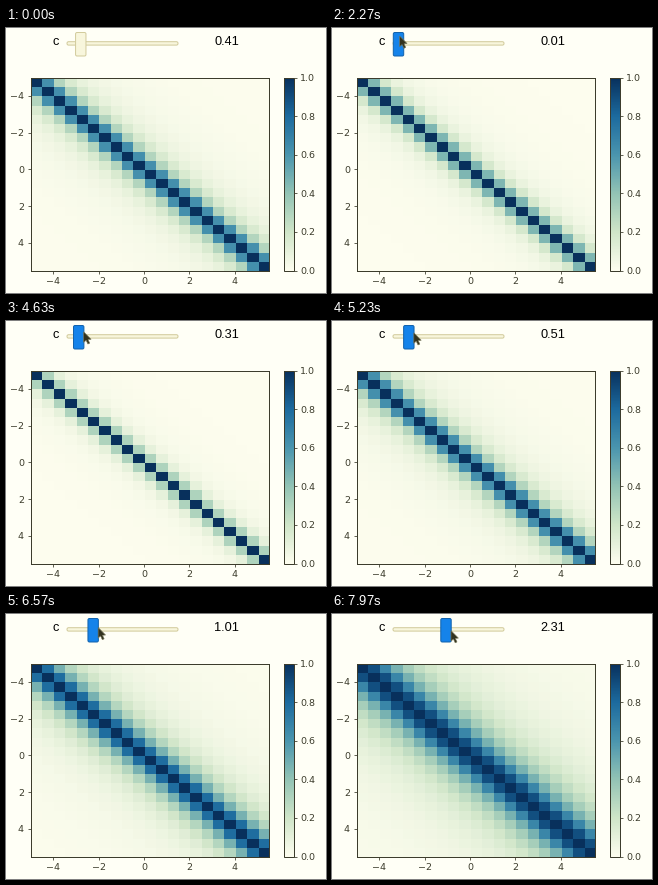
These frames come from a looping animation (320 by 265 pixels, 8000 ms). A matplotlib script:

```python
import numpy as np
import matplotlib.pyplot as plt
from matplotlib.animation import FuncAnimation
from matplotlib.colors import LinearSegmentedColormap
from matplotlib.patches import FancyBboxPatch, Polygon

W, H, DPI = 320, 265, 100
LOOP, FRAMES = 8000, 250
STEP = LOOP // FRAMES
PT = 72 / DPI              # points per pixel
LAG = 300                  # the heat map follows the slider with this delay
HOVER, PRESS = 950, 1600
PAPER, INK = "#fffff6", "#3c3c2c"
IDLE, WARM, ACTIVE = ("#f8f6dc", "#d2cb9c"), ("#eeebca", "#c8c190"), ("#1583ea", "#1263ad")

plt.rcParams.update({"font.family": "DejaVu Sans", "font.size": 9.5 * PT,
                     "axes.linewidth": PT, "axes.edgecolor": INK})


def ramp(t, start, end):
    return min(max((t - start) / (end - start), 0), 1)


def value_at(t):
    steps = (4 - 4 * ramp(t, 1750, 2150) + 8 * ramp(t, 4000, 5770)
             + 2 * ramp(t, 5770, 6570) + 13 * ramp(t, 6570, 7970))
    return 0.01 + 0.1 * round(steps)


def handle_x(v):
    return 66.3 + 20.65 * v


def pointer_at(t):
    v = value_at(t)
    slip = 5 * ramp(t, 0, 4600) ** 2
    drop = 25 * (1 - ramp(t, 700, 1000))
    return np.array([handle_x(v) + slip, 7.5 + 6 * np.sqrt(v) - drop * 1.5])


grid = np.arange(-5, 5.5, 0.5)
dist2 = np.subtract.outer(grid, grid) ** 2


def kernel(c):
    return 1 / (1 + dist2 / c)


def pixel_axes(x0, y0, x1, y1):
    return fig.add_axes([x0 / W, 1 - y1 / H, (x1 - x0) / W, (y1 - y0) / H])


def rounded(x, y, w, h, r, colors):
    fill, edge = colors
    box = FancyBboxPatch((x, y), w, h, fc=fill, ec=edge, lw=PT,
                         boxstyle=f"round,pad=0,rounding_size={r}")
    return panel.add_patch(box)


fig = plt.figure(figsize=(W / DPI, H / DPI), dpi=DPI, facecolor=PAPER)
sea = LinearSegmentedColormap.from_list(
    "sea", ["#fdfdee", "#cfe5c8", "#92c3b4", "#4a95ae", "#1c6a9e", "#08305c"])

heat = pixel_axes(24.5, 49.5, 263, 242.5)
image = heat.imshow(kernel(0.41), cmap=sea, vmin=0, vmax=1, aspect="auto",
                    extent=(-5, 5.5, 5.5, -5), interpolation="nearest")
heat.set_xticks(range(-4, 5, 2))
heat.set_yticks(range(-4, 5, 2))
bar = fig.colorbar(image, cax=pixel_axes(278, 49.5, 287.5, 242.5))
bar.set_ticks(np.linspace(0, 1, 6))
for ax in (heat, bar.ax):
    ax.tick_params(length=3.3 * PT, pad=3.3 * PT, width=0.8 * PT,
                   color=INK, labelcolor=INK)

panel = pixel_axes(0, 0, W, H)
panel.set(xlim=(0, W), ylim=(H, 0))
panel.axis("off")
label = dict(family="Liberation Sans", size=12.7 * PT, va="baseline")
panel.text(46.8, 17.2, "c", **label)
readout = panel.text(208.4, 17.2, "", **label)
rounded(61, 13.7, 111, 3.4, 1.6, IDLE)
handle = rounded(69, 4.5, 10.4, 23.5, 1.5, IDLE)

arrow = np.array([(0, 0), (0, 10.5), (2.4, 8.4), (4.2, 12.2),
                  (6, 11.3), (4.3, 7.7), (7.4, 7.5)])
pointer = panel.add_patch(Polygon(arrow, fc="#33331f", ec="#77775a", lw=0.6 * PT))


def draw(i):
    t = i * STEP
    v = value_at(t)
    readout.set_text(f"{v:.2f}")
    fill, edge = ACTIVE if t >= PRESS else WARM if t >= HOVER else IDLE
    handle.set_x(handle_x(v) - 5.2)
    handle.set_facecolor(fill)
    handle.set_edgecolor(edge)
    pointer.set_xy(arrow + pointer_at(t))
    image.set_data(kernel(value_at(t - LAG)))
    return image, readout, handle, pointer


anim = FuncAnimation(fig, draw, frames=FRAMES, interval=STEP, repeat=True,
                     repeat_delay=0, blit=False)
plt.show()
```
